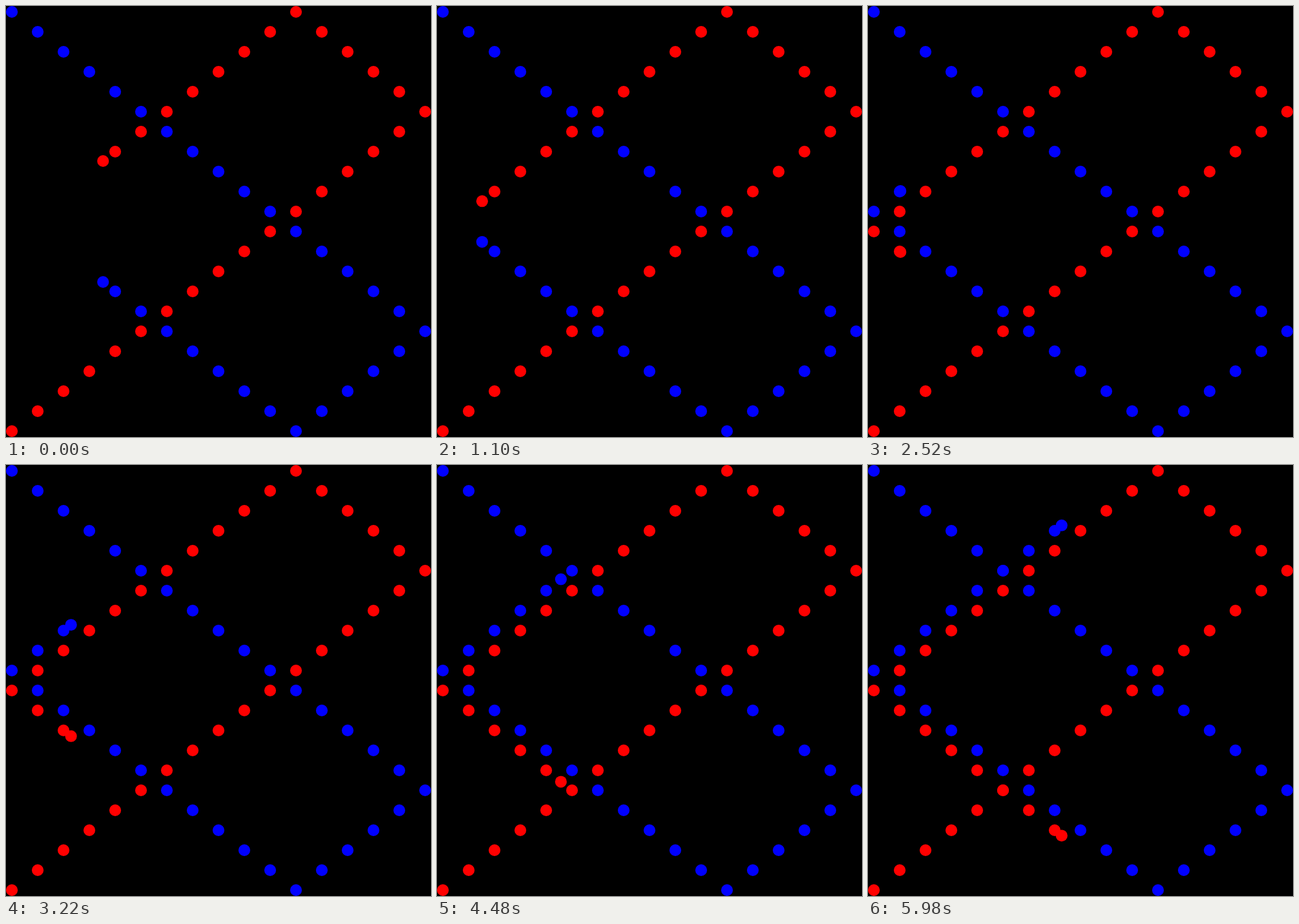
An HTML page with a canvas that plays this animation: 724x734 px, repeating every 6 s.

```html
<!DOCTYPE html>
<html lang="en">
<head>
<meta charset="utf-8">
<title>Bouncing dots</title>
<style>
  html, body { margin: 0; width: 100%; height: 100%; overflow: hidden; background: #000; }
  canvas { display: block; }
</style>
</head>
<body>
<canvas id="stage" width="724" height="734"></canvas>
<script>
const ctx = document.getElementById('stage').getContext('2d');
const W = 724, H = 734, R = 10;
const STEP_X = 44, STEP_Y = 34, COLS = 16, ROWS = 21;
const LOOP = 6000, TICK = 20;

// Triangle wave: runs from 0 up to size and back
const bounce = (p, size) => size - Math.abs(p % (2 * size) - size);

function dot(p, flip) {
  const x = R + STEP_X * bounce(p, COLS);
  const y = R + STEP_Y * bounce(p, ROWS);
  ctx.beginPath();
  ctx.arc(x, flip ? H - y : y, R, 0, 2 * Math.PI);
  ctx.fill();
}

function trail(color, p, flip) {
  ctx.fillStyle = color;
  for (let i = 0; i <= p; i++) dot(i, flip);
  dot(p, flip);
}

// Moves 0.03 cells at 60 Hz, shown at 50 Hz
function progress(ms) {
  const n = Math.floor(ms / TICK);
  const k = n ? Math.floor(1.2 * n + 1.7) : 0;
  return 28.47 + 0.03 * k;
}

const start = performance.now();

function draw() {
  const p = progress((performance.now() - start) % LOOP);
  ctx.fillStyle = '#000';
  ctx.fillRect(0, 0, W, H);
  trail('#00f', p, false);
  trail('#f00', p, true);
  requestAnimationFrame(draw);
}
draw();
</script>
</body>
</html>
```
